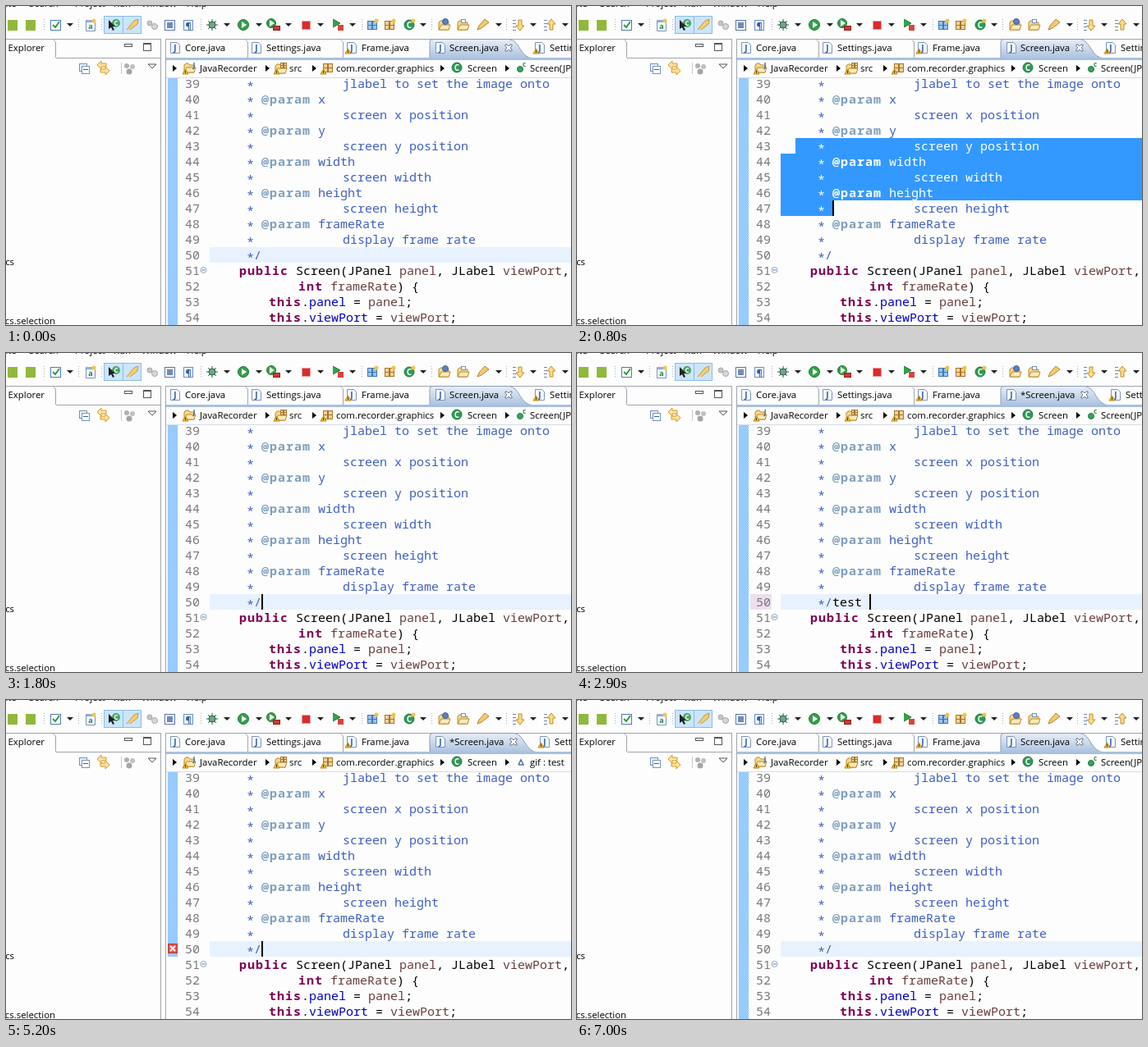
Write an HTML page with a canvas that moves like this. It is 688x389 px and loops after 7600 ms.

```html
<!DOCTYPE html>
<html>
<head>
<meta charset="utf-8">
<style>
html, body { margin: 0; width: 100%; height: 100%; overflow: hidden; background: #fdfdfd; }
canvas { display: block; }
</style>
</head>
<body>
<canvas width="688" height="389"></canvas>
<script>
const g = document.querySelector('canvas').getContext('2d');
const LOOP = 7600, ROW = 19, COL = 9, LEFT = 248, END = 311;
const EDGE = '#a0a5ad', DOC = '#3f5fbf';
const UI = '11.4px "Open Sans", "Noto Sans", sans-serif';
const MONO = '15px "Noto Sans Mono", "DejaVu Sans Mono", monospace';
const indent = ' '.repeat(12);
// The leading comment stars are drawn apart, centred on their rows
const code = [
  ...['jlabel to set the image onto', '@x', 'screen x position', '@y', 'screen y position',
    '@width', 'screen width', '@height', 'screen height', '@frameRate', 'display frame rate']
    .map(s => '      ' + (s[0] === '@' ? ' @param ' + s.slice(1) : indent + s)),
  '      /',
  '    public Screen(JPanel panel, JLabel viewPort,',
  indent + 'int frameRate) {',
  '        this.panel = panel;',
  '        this.viewPort = viewPort;'
];
const rowTop = n => 85 + (n - 39) * ROW;
const within = (t, ...spans) => spans.some(([a, b]) => t >= a && t < b);

// Shape helpers
function rect(x, y, w, h, fill, line) {
  if (fill) { g.fillStyle = fill; g.fillRect(x, y, w, h); }
  if (line) { g.strokeStyle = line; g.lineWidth = 1; g.strokeRect(x + .5, y + .5, w - 1, h - 1); }
}
function disc(x, y, r, fill, line) {
  g.beginPath(); g.arc(x, y, r, 0, 7);
  if (fill) { g.fillStyle = fill; g.fill(); }
  if (line) { g.strokeStyle = line; g.lineWidth = 1; g.stroke(); }
}
function poly(points, fill, line, width = 1) {
  g.beginPath();
  for (let i = 0; i < points.length; i += 2) g.lineTo(points[i], points[i + 1]);
  if (fill) { g.fillStyle = fill; g.fill(); }
  if (line) { g.strokeStyle = line; g.lineWidth = width; g.stroke(); }
}
function text(s, x, y, color = '#000', font = UI, align = 'left') {
  g.font = font; g.fillStyle = color; g.textAlign = align;
  g.fillText(s, x, y);
}
const glyph = (s, x, y, color, size = 9) => text(s, x, y, color, `bold ${size}px "Open Sans", sans-serif`, 'center');
const drop = x => poly([x - 4, 21, x + 4, 21, x, 25], '#222');
const chevron = x => poly([x - 2, 72, x + 3, 76, x - 2, 80], '#000');
const warn = (x, y) => {
  poly([x, y, x + 3.5, y - 6, x + 7, y, x, y], '#f6c435', '#b98414');
  rect(x + 3, y - 4, 1, 3, '#553300');
};
function dots(x) {
  for (let y = 16; y < 31; y += 3) rect(x, y, 1, 1, '#a5adb8');
}
function page(x, y, w = 11, h = 13) {
  poly([x, y, x + w - 3, y, x + w, y + 3, x + w, y + h, x, y + h, x, y], '#f4f8ff', '#7e93b8');
}
function folder(x, y) {
  poly([x, y + 11, x, y + 2, x + 2, y, x + 5, y, x + 7, y + 2, x + 12, y + 2, x + 12, y + 11, x, y + 11], '#f6d98c', '#b9892f');
  poly([x, y + 11, x + 3, y + 5, x + 14, y + 5, x + 12, y + 11, x, y + 11], '#fceab5', '#b9892f');
}
function parcel(x, y, size = 12, fill = '#f0d199', line = '#a8752c') {
  const mid = size / 2 - 1;
  rect(x, y, size, size - 1, fill, line);
  rect(x + mid, y, 2, size - 1, line); rect(x, y + mid, size, 1, line);
}
function classIcon(x, y) {
  disc(x, y, 6, '#2f9a55', '#1d7a3f'); glyph('C', x, y + 3.5, '#fff', 10);
}
function javaFile(x, warning) {
  page(x + .5, 44.5); glyph('J', x + 6, 55, '#2d5fa5', 10);
  if (warning) warn(x - 2, 58);
}
function play(x, y = 23, r = 6.5) {
  disc(x, y, r, '#35a04a', '#1c7a30');
  poly([x - 2, y - 4, x + 4, y, x - 2, y + 4], '#fff');
}
function arrow(x, y, dir) {
  poly([x, y - 2, x + 6 * dir, y - 2, x + 6 * dir, y - 5, x + 11 * dir, y, x + 6 * dir, y + 5, x + 6 * dir, y + 2, x, y + 2, x, y - 2], '#fbe3a0', '#d99a22');
}

function toolbar() {
  rect(0, 0, 688, 40, '#fdfdfd');
  [['ate', -4], ['Search', 28], ['Project', 84], ['Run', 131], ['Window', 165], ['Help', 220]]
    .forEach(([s, x]) => text(s, x, 1));
  rect(2, 17, 12, 13, '#91b83d');
  rect(24, 17, 12, 13, '#91b83d');
  [46, 88, 116, 237, 433, 518, 609].forEach(dots);
  rect(54, 17, 13, 13, '#fff', '#4d7eaa');
  poly([57, 23, 60, 26, 65, 19], null, '#2f9a45', 2);
  page(97.5, 17.5); rect(98, 17, 10, 3, '#8eb0dc'); glyph('a', 103, 28, '#278548'); disc(107, 18, 2.5, '#f4c542');
  rect(119, 12, 24, 22, '#cce5fb', '#8bbce8');
  rect(142, 12, 23, 22, '#cce5fb', '#8bbce8');
  disc(134, 21, 5, '#4aa564'); glyph('C', 134, 24, '#fff', 8);
  poly([125, 17, 125, 28, 128, 26, 130, 30, 132, 29, 130, 25, 133, 25], '#222');
  poly([147, 29, 156, 18, 161, 16, 160, 22, 151, 29], '#f3cf70', '#c3974b');
  disc(175, 21, 3, '#c4c7cc', '#a4a8ae'); disc(181, 25, 3.5, '#d5d7da', '#a4a8ae');
  rect(193, 17, 13, 13, '#fff', '#5574ac'); rect(196, 20, 7, 7, '#8ba3cc');
  for (let y = 20; y < 28; y += 2) rect(196, y, 7, 1, '#5574ac');
  rect(216, 17, 12, 13, '#eef4ff', '#6e8fc5'); glyph('¶', 222, 28, '#2d5fa5', 11);
  for (let i = 0; i < 4; i++) {
    const a = i * Math.PI / 4, c = Math.cos(a) * 7, s = Math.sin(a) * 7;
    poly([251 - c, 23 - s, 251 + c, 23 + s], null, '#2c5c50');
  }
  disc(251, 23, 4, '#6fa87c', '#2c5c50');
  play(289); play(323, 21, 5.5);
  rect(325, 24, 9, 6, '#c93c36', '#8e2020');
  rect(360, 18, 11, 11, '#f3c3c0', '#dfa19e'); rect(361, 19, 9, 9, '#dc2a2a');
  poly([398, 16, 407, 21, 398, 26], '#36a04a', '#1c7a30'); rect(404, 23, 7, 7, '#d84440');
  [78, 269, 308, 344, 383, 422, 508, 600, 642, 681].forEach(drop);
  parcel(440, 18, 12, '#9cc3ea', '#3f78b5'); disc(451, 18, 2.5, '#f4c542');
  parcel(461, 18); disc(472, 18, 2.5, '#f4c542');
  classIcon(491, 23); disc(496, 18, 2.5, '#f4c542');
  folder(527, 18); disc(535, 19, 3.5, '#5f7fc0', '#3f5f9f');
  folder(550, 18); rect(554, 16, 6, 5, '#fff', '#6e8fc5');
  poly([574, 29, 576, 24, 583, 16, 588, 20, 579, 27, 574, 29], '#f5c872', '#b88330');
  [617, 655].forEach((x, i) => {
    for (let y = 17; y < 30; y += 4) rect(x, y, 4, 1, '#6e87af');
    const d = i ? -1 : 1, y = i ? 16 : 30;
    poly([x + 9, y, x + 4, y - 6 * d, x + 7, y - 6 * d, x + 7, y - 13 * d, x + 11, y - 13 * d,
      x + 11, y - 6 * d, x + 14, y - 6 * d, x + 9, y], '#f9dc8c', '#c58d22');
  });
}

function explorer() {
  rect(0, 40, 195, 349, '#fdfdfd');
  rect(0, 40, 189, 1, EDGE); rect(61, 63, 128, 1, EDGE);
  poly([57, 40.5, 60.5, 44, 60.5, 63], null, EDGE);
  rect(188, 40, 1, 349, EDGE); rect(194, 40, 1, 349, EDGE);
  text('t Explorer', 47, 55, '#000', UI, 'right');
  rect(149 - 5, 46, 10, 4, '#fff', '#555');
  rect(167, 45, 10, 10, '#fff', '#555'); rect(167, 46, 10, 1, '#555');
  rect(89, 70, 10, 10, '#e9f1fc', '#7592bd'); rect(92, 73, 10, 10, '#fff', '#7592bd'); rect(94, 77, 6, 1, '#2d5fa5');
  arrow(122, 72, -1); arrow(115, 79, 1);
  rect(140, 69, 1, 14, '#c8c8c8');
  disc(147, 73, 3, '#b0b0b0'); disc(154, 74, 3, '#c0c0c0'); disc(150, 80, 3.5, '#a5a5a5');
  poly([173, 71, 183, 71, 178, 76, 173, 71], '#fff', '#555');
  text('cs', 10, 316, '#000', UI, 'right');
  text('cs.selection', 60, 388, '#000', UI, 'right');
}

function tabs(dirty) {
  const shift = dirty ? 6 : 0;
  rect(195, 40, 493, 24, '#fdfdfd');
  rect(195, 40, 493, 1, EDGE); rect(195, 63, 493, 1, EDGE);
  [293, 409].forEach(x => poly([x - 2, 40.5, x + 1.5, 44, x + 1.5, 63], null, EDGE));
  const fade = g.createLinearGradient(0, 41, 0, 65);
  fade.addColorStop(0, '#e6edf7'); fade.addColorStop(1, '#a9c0de');
  g.beginPath();
  g.moveTo(516, 65); g.lineTo(516, 44); g.quadraticCurveTo(516, 40.5, 520, 40.5);
  g.lineTo(612 + shift, 40.5);
  g.bezierCurveTo(626 + shift, 41, 625 + shift, 63, 642 + shift, 64);
  g.fillStyle = fade; g.fill();
  g.strokeStyle = '#8b9db5'; g.lineWidth = 1; g.stroke();
  rect(195, 63, 493, 3, '#a9c0de');
  javaFile(200); text('Core.java', 218, 55);
  javaFile(299); text('Settings.java', 317, 55);
  javaFile(415, true); text('Frame.java', 433, 55);
  javaFile(523); text((dirty ? '*' : '') + 'Screen.java', 540, 55);
  const x = 612 + shift;
  poly([x - 4, 47, x - 2, 47, x, 49, x + 2, 47, x + 4, 47, x + 4, 49, x + 2, 51, x + 4, 53, x + 4, 55,
    x + 2, 55, x, 53, x - 2, 55, x - 4, 55, x - 4, 53, x - 2, 51, x - 4, 49, x - 4, 47], '#fff', '#687587');
  javaFile(644 + shift, true); text('Settings.java', 662 + shift, 55);
}

function breadcrumb(field) {
  rect(195, 66, 493, 21, '#fdfdfd'); rect(195, 87, 493, 1, '#d5dce8');
  [205, 318, 375, 531, 610].forEach(chevron);
  folder(217, 70); glyph('J', 229, 75, '#2d5fa5', 8); warn(215, 83);
  text('JavaRecorder', 236, 80);
  folder(328, 71); parcel(334, 69, 8); warn(326, 83);
  text('src', 345, 80);
  parcel(386, 70); warn(383, 83);
  text('com.recorder.graphics', 402, 80);
  classIcon(549, 75); text('Screen', 562, 80);
  if (field) poly([624, 79, 627, 73, 630, 79, 624, 79], '#fff', '#4573a7', 1.5);
  else {
    disc(626, 77, 3.5, '#39a35c', '#1d7a3f'); glyph('c', 631, 74, '#2e8b4e', 8);
  }
  text(field ? 'gif : test' : 'Screen(JPanel, JLabel', 638, 80);
}

const tokens = /(@param|\b(?:public|int|this)\b|(?<=this\.)\w+|\b(?:panel|viewPort|frameRate)\b)/;
const keyword = /^(@param|public|int|this)$/;

function drawCode(typed, white) {
  code.forEach((line, i) => {
    const n = 39 + i, doc = n <= 50, y = rowTop(n) + 15;
    let x = LEFT;
    const run = (s, color, bold) => {
      g.letterSpacing = bold ? '1px' : '0px';
      text(s, x, y, white ? '#fff' : color, (bold ? 'bold ' : '') + MONO);
      x += s.length * (bold ? COL + 1 : COL);
    };
    line.split(tokens).forEach((s, k, all) => {
      if (keyword.test(s)) run(s, doc ? '#7f9fbf' : '#7f0055', true);
      else if (doc) run(s, DOC);
      else if (k % 2) run(s, all[k - 1] === '.' ? '#0000c0' : '#6a3e3e');
      else run(s, '#000');
    });
    if (n === 50) run(typed, '#000');
    g.letterSpacing = '0px';
    if (doc) text('*', LEFT + 5 * COL, y + 3, white ? '#fff' : DOC, MONO);
  });
}

// Everything in the editor that depends on time
function stateAt(t) {
  const s = { typed: '', sel: [], row: 50, caret: END };
  if (within(t, [2500, 5100])) {
    const count = t >= 3500 ? 9 : Math.min(8, Math.floor((t - 2500) / 100) + 1);
    s.typed = 'test gif!'.slice(0, count);
    s.caret = END + count * COL;
  }
  if (within(t, [700, 800])) { s.row = 43; s.caret = 266; }
  if (within(t, [800, 1800])) {
    const last = t < 900 ? 47 : 50;
    s.row = 0; s.caretRow = last;
    for (let n = 43; n <= last; n++) {
      const x = n === 43 ? 266 : LEFT;
      s.sel.push([x, n, (n === last ? END : 688) - x]);
    }
  }
  if (within(t, [4300, 5100])) {
    s.caret = END + (t < 4400 ? 8 : t < 4600 ? 5 : 0) * COL;
    s.sel.push([s.caret, 50, END + 9 * COL - s.caret]);
  }
  s.blink = within(t, [700, 1300], [1800, 2300], [2500, 4100], [4300, 5700], [6100, 6600]);
  s.dirty = within(t, [2500, 6000]);
  s.changed = within(t, [2500, 5100]);
  s.error = within(t, [4900, 5800]);
  s.field = within(t, [5200, 5800]);
  s.shortRange = within(t, [5200, 6600]);
  return s;
}

const hatch = (() => {
  const c = document.createElement('canvas');
  c.width = c.height = 2;
  const k = c.getContext('2d');
  k.fillStyle = '#fdfdfd'; k.fillRect(0, 0, 2, 2);
  k.fillStyle = '#3399ff'; k.fillRect(0, 0, 1, 1); k.fillRect(1, 1, 1, 1);
  return g.createPattern(c, 'repeat');
})();

function editor(s) {
  rect(195, 85, 493, 304, '#fdfdfd');
  rect(197, 88, 12, (s.shortRange ? 313 : 389) - 88, hatch);
  if (s.row) rect(LEFT, rowTop(s.row), 688 - LEFT, ROW, '#e8f2fe');
  if (s.changed) rect(211, rowTop(50), 26, ROW, '#eedfee');
  for (let n = 39; n < 55; n++) text(n, 236, rowTop(n) + 15, '#787878', MONO, 'right');
  disc(240.5, 322, 3.5, '#fff', '#8ca5c5'); rect(238.5, 321.5, 4, 1, '#587ba8');
  drawCode(s.typed);
  if (s.sel.length) {
    g.save();
    g.beginPath();
    s.sel.forEach(([x, n, w]) => g.rect(x, rowTop(n), w, ROW));
    g.clip();
    rect(LEFT, 85, 440, 304, '#3399ff');
    drawCode(s.typed, true);
    g.restore();
  }
  if (s.blink) rect(s.caret, rowTop(s.caretRow || s.row), 2, ROW, '#000');
  if (s.error) {
    rect(197, 297, 12, 12, '#dc5a55', '#b5383a');
    poly([200, 300, 206, 306], null, '#fff', 2);
    poly([206, 300, 200, 306], null, '#fff', 2);
  }
}

function frame(now) {
  const s = stateAt(now % LOOP);
  editor(s);
  toolbar();
  explorer();
  tabs(s.dirty);
  breadcrumb(s.field);
  requestAnimationFrame(frame);
}
frame(performance.now());
</script>
</body>
</html>
```
